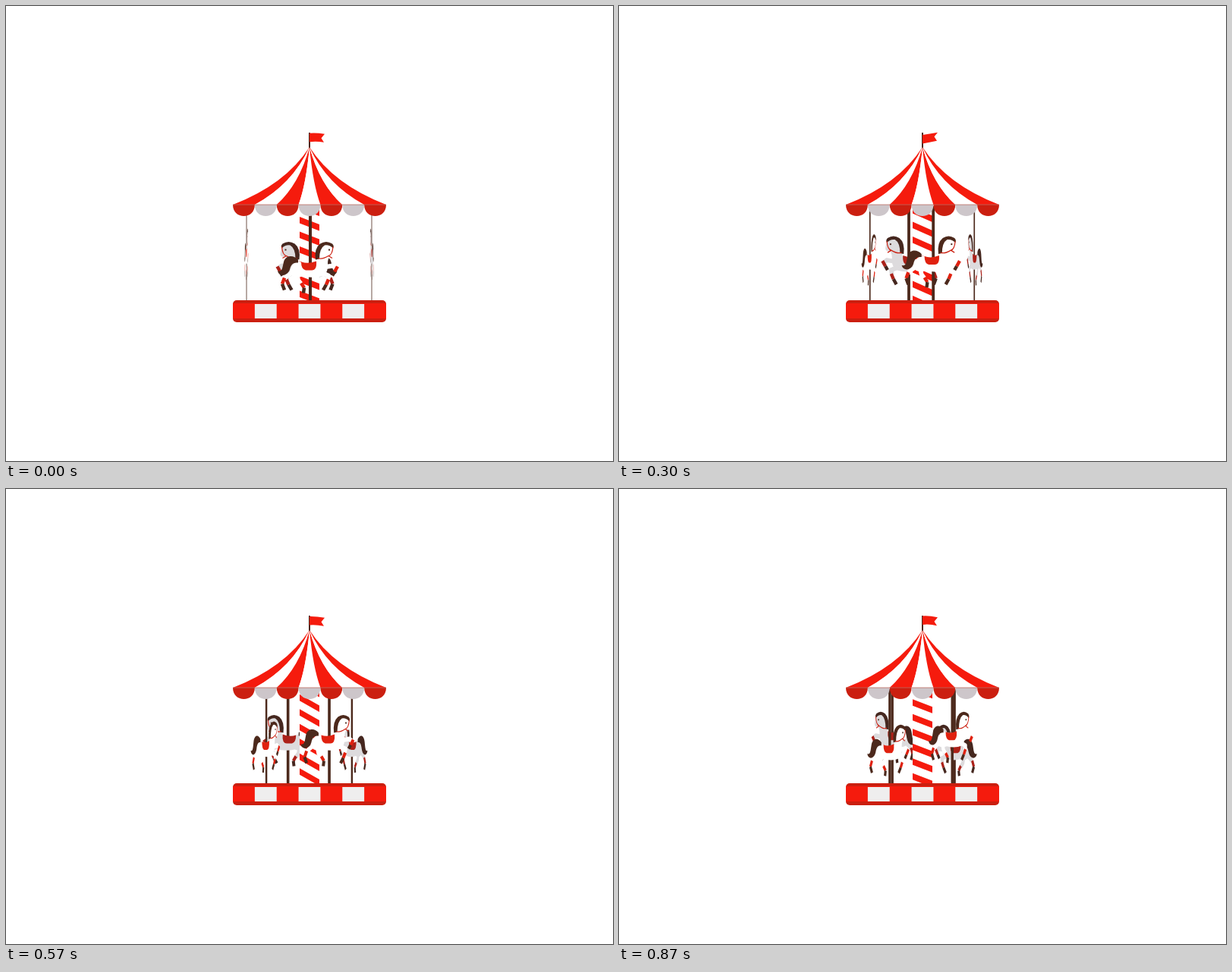
An HTML page with a canvas that plays this animation: 800x600 px, repeating every 0.9 s.

```html
<!DOCTYPE html>
<html lang="en">
<head>
<meta charset="utf-8">
<title>Carousel</title>
<style>
html, body { margin: 0; width: 100%; height: 100%; overflow: hidden; background: #fff; }
canvas { display: block; }
</style>
</head>
<body>
<canvas id="stage" width="800" height="600"></canvas>
<script>
const ctx = document.getElementById('stage').getContext('2d');
const LOOP = 900, STEP = 30;
const RED = '#f51b0d', DEEP = '#cb1f10', BROWN = '#4c291c', GREY = '#cdc6ca';
const LEFT = 299, SEGMENT = 202 / 7, EAVES = 262, FLOOR = 388;
const FRONT = { body: '#fff', saddle: '#e0210f', mane: BROWN };
const BACK = { body: '#dddbdd', saddle: '#ac2119', mane: '#45271f' };

function fill(color, path) {
  ctx.fillStyle = color;
  ctx.fill(new Path2D(path));
}

function stroke(color, width, path) {
  ctx.strokeStyle = color;
  ctx.lineWidth = width;
  ctx.stroke(new Path2D(path));
}

function rect(color, x, y, w, h) {
  ctx.fillStyle = color;
  ctx.fillRect(x, y, w, h);
}

// Local origin: pole centre, top of the mane; the horse looks right.
function horse(x, y, scale, look) {
  ctx.save();
  ctx.translate(x, y);
  ctx.scale(scale, 1);
  ctx.lineJoin = 'round';
  const { body, saddle, mane } = look;
  fill(body, 'M9 27C8 12 12 2 20 2C27 2 31 8 32 17Q31 21 27 20Q23 21 23 29Q24 39 18 45' +
    'Q5 49 -10 46Q-24 50 -27 41Q-27 30 -16 26Q-4 31 9 27Z');
  stroke(body, 6, 'M17 34L30 32L34 35');
  stroke(body, 6, 'M14 41L24 45L23 51M-21 39L-30 45L-34 49M-18 42L-16 51L-12 56');
  fill(mane, 'M7 24Q5 9 13 3Q21 -2 29 3Q32 6 30 9Q25 4 19 5Q12 9 12 23Z');
  fill(mane, 'M-16 24C-22 17 -33 18 -35 27C-37 36 -37 40 -43 39C-41 47 -30 46 -27 37' +
    'C-25 29 -22 28 -16 28Z');
  fill(saddle, 'M-12 27Q-3 30 8 26Q9 38 2 38L-6 38Q-12 37 -12 27Z');
  stroke(DEEP, 1.2, 'M30 7Q29 18 24 19Q16 24 10 22M24 19L29 22');
  fill(mane, 'M24 10h2v2h-2Z');
  stroke(saddle, 4.5, 'M36 33L32 40M24 50L21 57M-34 48L-37 56M-12 55L-8 61');
  stroke(mane, 4.5, 'M32 40L29 45M21 57L17 64M-37 56L-34 64M-8 61L-9 68');
  ctx.restore();
}

function rider(x, y, scale, poleWidth, look) {
  rect(BROWN, x - poleWidth / 2, 264, poleWidth, FLOOR - 264);
  horse(x, y, scale, look);
}

function pillar(u) {
  ctx.save();
  ctx.beginPath();
  ctx.rect(387, EAVES, 26, FLOOR - EAVES);
  ctx.clip();
  rect('#fff', 387, EAVES, 26, FLOOR - EAVES);
  const drop = 10 + 7 * Math.exp(-(((u - 0.53) / 0.16) ** 2));
  const gap = 19.5, thick = 8.5;
  for (let y = 239 + gap * u; y < FLOOR; y += gap) {
    fill(RED, `M387 ${y}l26 ${drop}v${thick}l-26 ${-drop}Z`);
  }
  ctx.restore();
}

function canopy() {
  const bend = x => 400 + (x - 400) * 0.31;
  for (let i = 0; i < 7; i++) {
    const a = LEFT + i * SEGMENT, b = a + SEGMENT;
    fill(i % 2 ? '#fff' : RED,
      `M400 186Q${bend(a)} 235 ${a} ${EAVES}H${b}Q${bend(b)} 235 400 186Z`);
  }
  for (let i = 0; i < 7; i++) {
    const a = LEFT + i * SEGMENT, b = a + SEGMENT;
    fill(i % 2 ? GREY : DEEP,
      `M${a} ${EAVES}H${b}C${b} 272 ${b - 7} 277 ${a + SEGMENT / 2} 277` +
      `C${a + 7} 277 ${a} 272 ${a} ${EAVES}Z`);
  }
  rect('#b8695f', LEFT, EAVES - 0.4, 202, 0.8);
}

function base() {
  ctx.save();
  ctx.beginPath();
  ctx.roundRect(LEFT, FLOOR, 202, 29, 5);
  ctx.clip();
  rect(DEEP, LEFT, FLOOR, 202, 29);
  rect(RED, LEFT, 392, 202, 20);
  for (let i = 1; i < 7; i += 2) {
    rect('#efeeee', LEFT + i * SEGMENT, 393, SEGMENT, 19);
  }
  ctx.restore();
}

function flag(u) {
  const wave = Math.sin(2 * Math.PI * (u - 0.08));
  const near = 168.5 + 1.6 * wave;
  const far = 168.5 - 2 * Math.sin(2 * Math.PI * (u - 0.02));
  const mid = (near + far) / 2 - 0.8 + wave;
  rect(BROWN, 399, 167, 2, 21);
  fill(RED, `M400 ${near}Q409 ${mid} 420 ${far}L415.5 ${far + 5.5}L419 ${far + 11}` +
    `Q409 ${mid + 11} 400 ${near + 11.5}Z`);
}

function draw(time) {
  const u = Math.floor((time % LOOP) / STEP) * STEP / LOOP;
  const travel = 41.2 * u;
  const wide = Math.cos(u * Math.PI / 4);
  const narrow = Math.max(0.06, Math.sin(u * Math.PI / 4));
  const lift = 17.5 * (1 - (1 - u) ** 1.35);
  const low = 310.5 - lift, high = 293 + lift;
  const thin = 0.8 + 2.6 * u, thick = 4 - 0.6 * u;

  rect('#fff', 0, 0, 800, 600);
  rider(482 - travel, high, -narrow, thin, BACK);
  rider(393.5 - 34.5 * u, low, -wide, thick, BACK);
  pillar(u);
  rider(317 + travel, high, narrow, thin, FRONT);
  rider(401 + travel * 0.96, low, wide, thick, FRONT);
  flag(u);
  canopy();
  base();
}

const start = performance.now();
function tick() {
  draw(performance.now() - start);
  requestAnimationFrame(tick);
}
tick();
</script>
</body>
</html>
```
